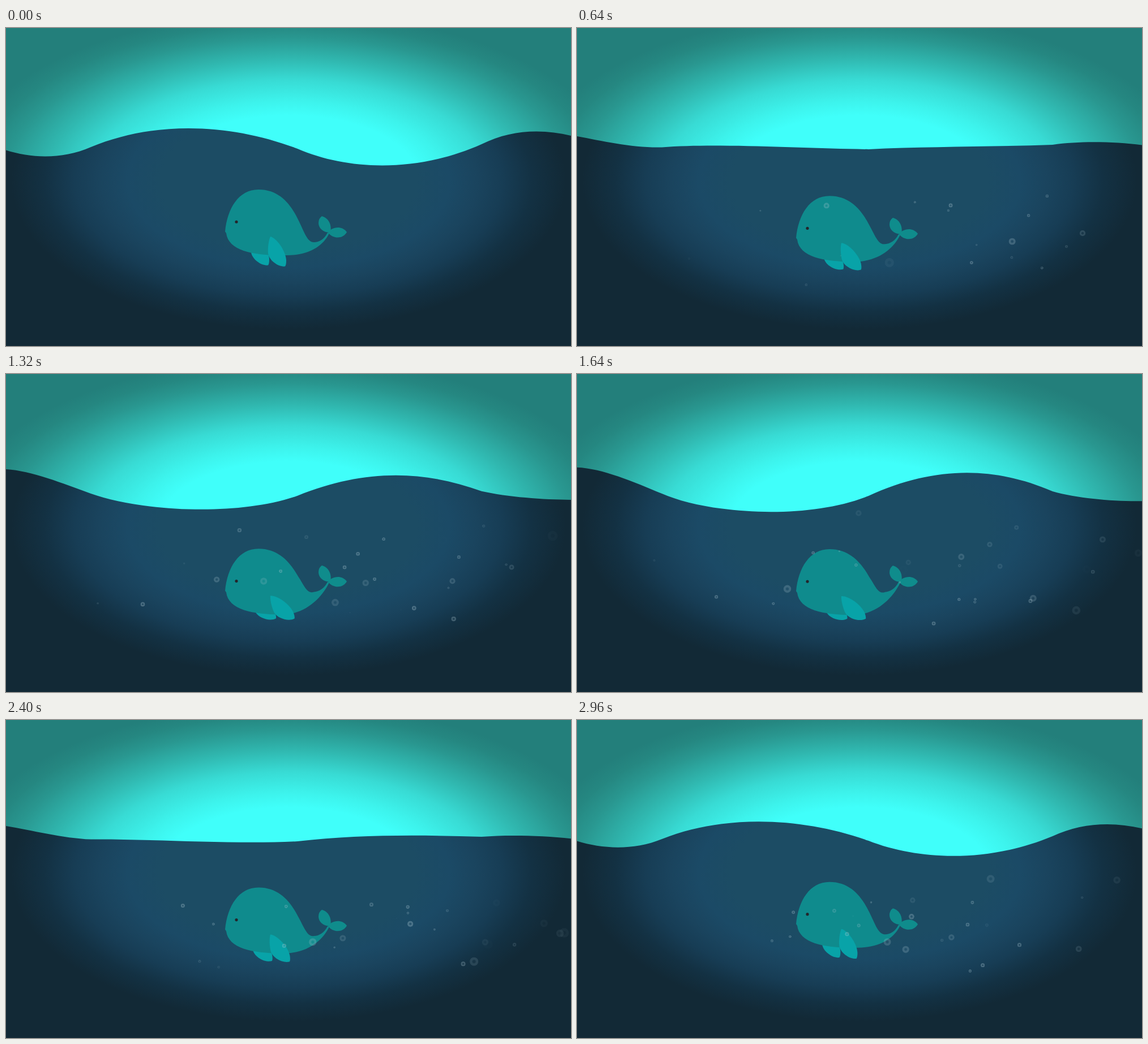
Animation, 998 px wide and 561 px high, one loop 3 s. Source, as an HTML page:

```html
<!DOCTYPE html>
<html lang="en">
<head>
<meta charset="utf-8">
<title>Whale</title>
<style>
  html, body { margin: 0; width: 100%; height: 100%; overflow: hidden; background: #122936; }
  svg { display: block; width: 100%; height: 100%; }
</style>
</head>
<body>
<svg viewBox="0 0 998 561" preserveAspectRatio="none">
  <defs>
    <radialGradient id="skyFill" gradientUnits="userSpaceOnUse" cx="0" cy="0" r="1"
        gradientTransform="translate(499 270) scale(590 298)">
      <stop offset=".39" stop-color="#40fffa"/>
      <stop offset=".475" stop-color="#3df3ec"/>
      <stop offset=".6" stop-color="#38dbd4"/>
      <stop offset=".725" stop-color="#30b8b0"/>
      <stop offset=".85" stop-color="#299790"/>
      <stop offset=".93" stop-color="#258781"/>
      <stop offset="1" stop-color="#237f7b"/>
    </radialGradient>
    <radialGradient id="seaFill" gradientUnits="userSpaceOnUse" cx="0" cy="0" r="1"
        gradientTransform="translate(499 270) scale(490 262)">
      <stop offset=".46" stop-color="#1c4c64"/>
      <stop offset=".58" stop-color="#1b4a66"/>
      <stop offset=".68" stop-color="#1a445e"/>
      <stop offset=".77" stop-color="#173d55"/>
      <stop offset=".88" stop-color="#133143"/>
      <stop offset="1" stop-color="#122936"/>
    </radialGradient>
    <radialGradient id="bubbleFill">
      <stop offset="0" stop-color="#a9c4cf" stop-opacity=".1"/>
      <stop offset=".3" stop-color="#a9c4cf" stop-opacity=".15"/>
      <stop offset=".6" stop-color="#a9c4cf" stop-opacity=".6"/>
      <stop offset=".82" stop-color="#a9c4cf" stop-opacity=".45"/>
      <stop offset="1" stop-color="#c0d6de" stop-opacity=".65"/>
    </radialGradient>
    <path id="fin" d="M0 0C10 2 27 24 28 42Q28 50 26 52.5C14 54 -2 42 -4 30C-5 20 -3 6 0 0Z"/>
  </defs>
  <rect width="998" height="561" fill="url(#skyFill)"/>
  <path id="sea" fill="url(#seaFill)"/>
  <use id="backFin" href="#fin" fill="#08a3a8"/>
  <path id="body" fill="#0f8b8d"/>
  <g id="fluke" fill="#0f8c8c">
    <path d="M573 361C559 361 552 352 552 344Q552 336 558 332C569 335 576 346 573 361Z"/>
    <path d="M569 361C574 352 592 347 602 360C596 372 578 373 569 361Z"/>
  </g>
  <circle id="eye" cx="407" r="2.6" fill="#24252b"/>
  <use id="frontFin" href="#fin" fill="#08a3a8"/>
  <g id="bubbles" fill="url(#bubbleFill)"></g>
</svg>
<script>
const LOOP = 3000, STEP = 40, HEAD_DROP = 26.5, TAIL_DROP = 6.6;
const $ = id => document.getElementById(id);
const lerp = (a, b, p) => a + (b - a) * p;
const clamp = v => Math.min(1, Math.max(0, v));
const smooth = v => v * v * (3 - 2 * v);

const lowTide = 'M0 215.5C45 230 100 232 150 210C265 162 400 169 515 213C605 252 728 255 840 205C890 180 945 177 998 190V561H0Z';
const highTide = 'M0 164.3C45 166 100 190 150 211C230 247 405 260 515 215C630 162 735 161 840 207C885 220 950 225.5 998 224.5V561H0Z';
const body = 'M387 359C391 318 411 285 446 285C483 285 503 311 516 338C527 360 532 378 544 378C553 378 562 373 568 361L571 362C560 385 535 401 495 401C440 402 393 394 389 362Z';

// Blends two paths that share the same commands.
function blend(from, to, p) {
  const ends = to.match(/[\d.]+/g);
  let i = 0;
  return from.replace(/[\d.]+/g, n => lerp(+n, +ends[i++], p).toFixed(2));
}

// The head sinks furthest; the tail follows only a little.
function sink(path, dip) {
  return path.replace(/([\d.]+) ([\d.]+)/g, (_, x, y) => {
    const reach = x - .8 * Math.max(0, y - 378);
    const drop = lerp(HEAD_DROP, TAIL_DROP, smooth(clamp((reach - 500) / 50)));
    return `${x} ${(+y + drop * dip).toFixed(2)}`;
  });
}

let seed = 17;
function random(lo, hi) {
  seed = (seed * 16807) % 2147483647;
  return lerp(lo, hi, seed / 2147483647);
}

const bubbles = Array.from({ length: 92 }, (_, i) => {
  const node = document.createElementNS('http://www.w3.org/2000/svg', 'circle');
  $('bubbles').append(node);
  return {
    node, born: 60 + i * 32, life: random(650, 1100),
    x: 60 + 700 * Math.sqrt(random(0, 1)), y: random(320, 465),
    r: random(3, 10), vx: random(.25, .45), vy: random(-.1, -.03)
  };
});

function drawBubble({ node, born, life, x, y, r, vx, vy }, t) {
  const dt = t - born, age = dt / life;
  const visible = age > 0 && age < 1;
  node.setAttribute('display', visible ? 'inline' : 'none');
  if (!visible) return;
  const cx = x + vx * dt;
  const shade = Math.max(.45, clamp((1100 - cx) / 350));
  node.setAttribute('cx', cx);
  node.setAttribute('cy', y + vy * dt);
  node.setAttribute('r', r * (.2 + .8 * age));
  node.setAttribute('opacity', .65 * shade * clamp(age * 5) * clamp((1 - age) * 1.8));
}

function draw(t) {
  const half = LOOP / 2;
  const dip = 1 - Math.abs(1 - t / half);
  const lift = t < half ? .5 * dip : .38 + .7 * dip;
  const tide = dip + dip * (1 - dip) * lift;
  $('sea').setAttribute('d', blend(lowTide, highTide, tide));
  $('body').setAttribute('d', sink(body, dip));
  $('eye').setAttribute('cy', 342 + HEAD_DROP * dip);
  $('fluke').setAttribute('transform', `translate(0 ${TAIL_DROP * dip})`);
  const finY = 368 + HEAD_DROP * dip, turn = `rotate(${-23 * dip})`;
  $('frontFin').setAttribute('transform', `translate(467 ${finY}) ${turn}`);
  $('backFin').setAttribute('transform', `translate(${437 - 3 * dip} ${finY - 2 + 2 * dip}) ${turn}`);
  for (const bubble of bubbles) drawBubble(bubble, t);
}

const start = performance.now();
function tick() {
  const t = (performance.now() - start) % LOOP;
  draw(Math.floor(t / STEP) * STEP);
  requestAnimationFrame(tick);
}
tick();
</script>
</body>
</html>
```
